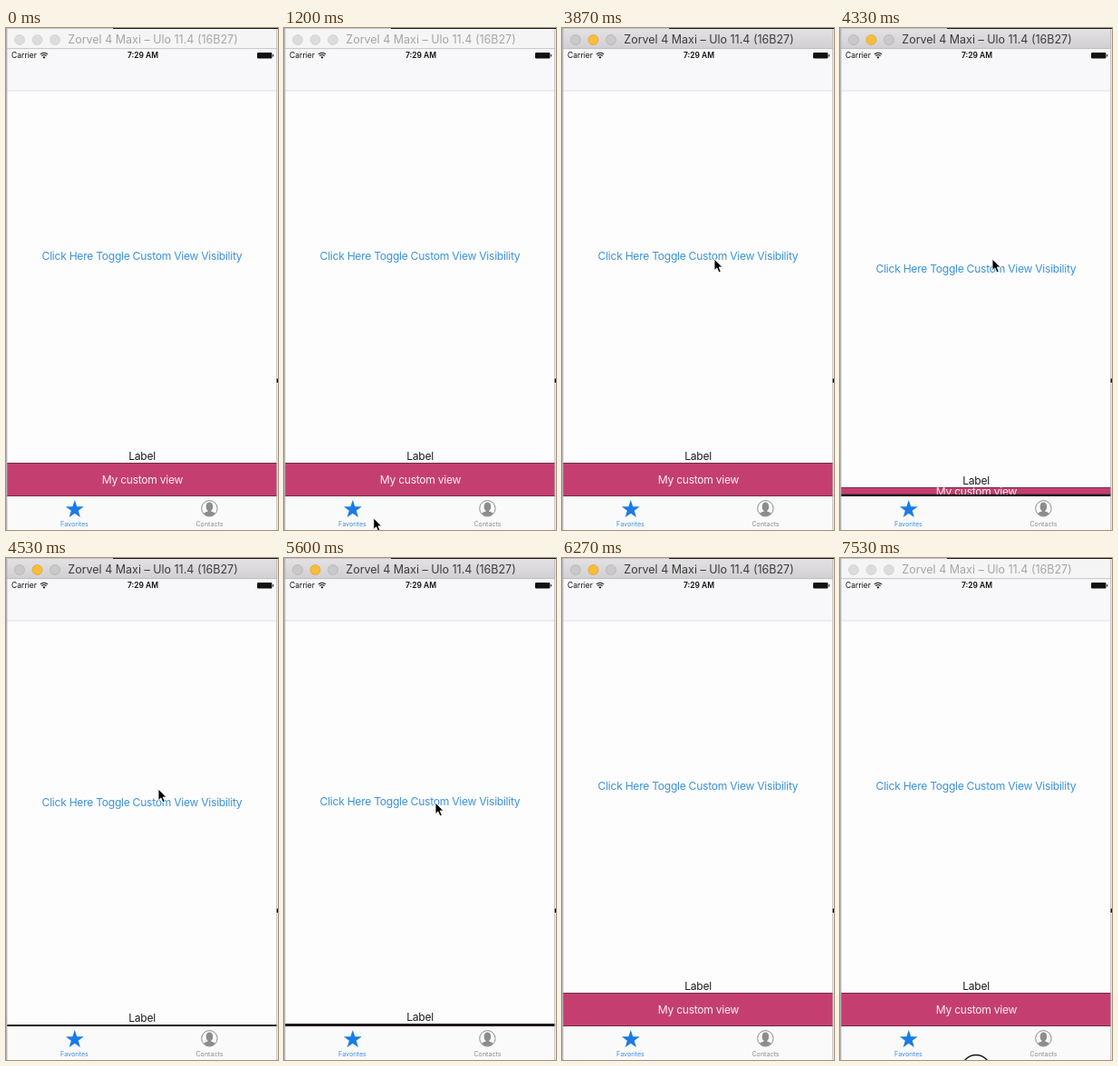
Recreate the animation shown at these times as an HTML page. Size 300 by 552 pixels, loop 7.59 s.

```html
<!DOCTYPE html>
<html lang="en">
<head>
<meta charset="utf-8">
<title>Toggle a bar above the tabs</title>
<style>
  html, body { margin: 0; width: 100%; height: 100%; overflow: hidden; background: #fff; }
  svg { display: block; width: 100vw; height: 100vh; }
  text { font-family: Inter, Roboto, "Liberation Sans", sans-serif; text-anchor: middle; }
  .body { font-size: 12.1px; letter-spacing: -.022em; }
  .status { font-size: 8.5px; }
  .tab { font-size: 7.15px; }
</style>
</head>
<body>
<svg viewBox="0 0 300 552">
  <defs>
    <linearGradient id="chrome" x2="0" y2="1">
      <stop stop-color="#e4e2e4"/><stop offset="1" stop-color="#d1cfd1"/>
    </linearGradient>
    <clipPath id="clip"><rect id="clipBox" width="300"/></clipPath>
  </defs>
  <rect width="300" height="552" fill="#fefdfe"/>

  <!-- moving content -->
  <text id="link" class="body" x="150" y="255.2" fill="#3a92dc">Click Here Toggle Custom View Visibility</text>
  <text id="label" class="body" x="150" y="475.3" fill="#1c1c1c">Label</text>
  <rect id="gap" width="300" fill="#1d181c"/>
  <g clip-path="url(#clip)">
    <rect id="bar" width="300" fill="#c43f70"/>
    <text id="barText" class="body" x="150.5" fill="#fbeef3">My custom view</text>
  </g>

  <!-- navigation and status -->
  <rect y="23" width="300" height="46" fill="#f8f7f9"/>
  <rect y="68.6" width="300" height=".8" fill="#d8d7d9"/>
  <g fill="#111">
    <text class="status" x="20" y="33.4">Carrier</text>
    <text class="status" x="151" y="33.4" font-weight="600">7:29 AM</text>
    <rect x="277" y="26.9" width="16.4" height="6.6" rx="1.2"/>
    <rect x="294.2" y="29" width="1" height="2.6" rx=".5"/>
    <path d="M42 33.8l-1.5-1.9q1.5-1.1 3 0z"/>
  </g>
  <path d="M39.3 30.6q2.7-2.2 5.4 0M37.9 28.9q4.1-3.3 8.2 0" fill="none" stroke="#111" stroke-width="1.1"/>

  <!-- tabs -->
  <rect y="515" width="300" height="37" fill="#fafafa"/>
  <path id="star" fill="#1a7be6"/>
  <text class="tab" x="75.5" y="547.8" fill="#3b8ce4">Favorites</text>
  <g fill="#8c8c8c">
    <circle cx="224.4" cy="528.3" r="8.7" fill="#fafafa" stroke="#8c8c8c" stroke-width="1"/>
    <ellipse cx="224.4" cy="526.4" rx="3.8" ry="5"/>
    <path d="M222.7 529h3.4v2.6q3.6 1 4.6 2.2a8 8 0 0 1-12.6 0q1-1.2 4.6-2.2z"/>
    <text class="tab" x="224.5" y="547.8">Contacts</text>
  </g>

  <!-- window frame -->
  <rect id="titleBar" width="300" height="23"/>
  <rect y="22.3" width="300" height=".8" fill="#b9b9b9"/>
  <g id="lights" stroke-width=".7">
    <circle cx="15" cy="13" r="5.5"/>
    <circle cx="34.5" cy="13" r="5.5"/>
    <circle cx="54" cy="13" r="5.5"/>
  </g>
  <text id="title" x="162" y="17.4" font-size="12.5">Zorvel 4 Maxi – Ulo 11.4 (16B27)</text>
  <rect width="118" height="1" fill="#c4c4c4"/>
  <rect x="118" width="182" height="1" fill="#161616"/>
  <rect width="1.4" height="552" fill="#b2b2b2"/>
  <rect x="298.3" y="1" width=".8" height="551" fill="#b5b5b5"/>
  <rect x="299.1" y="1" width=".9" height="551" fill="#e6e6e6"/>
  <rect x="298.6" y="385.5" width="1.4" height="4.5" fill="#111"/>

  <circle id="ring" cx="150" cy="562.5" fill="#fff" stroke="#111" stroke-width="1.3"/>
  <path id="cursor" d="M0 0V12.6L2.9 9.9 5 14.7 7.3 13.7 5.2 9H9.1Z" fill="#050505" stroke="#fff" stroke-width=".9" stroke-linejoin="round"/>
</svg>
<script>
const LOOP = 7590;
const ACTIVE = [1450, 7100];
const RING = [7400, 7530];
const BAR_TOP = 478, BAR_END = 512, TAB_TOP = 515;

// time, x, y of the pointer tip
const POINTER = [
  [870, 150, 560], [1400, 75, 529], [3220, 75, 529], [3730, 168, 254],
  [4640, 168, 254], [4930, 167, 269], [5930, 167, 269], [6230, 150, 560]
];
// time, top edge of the custom bar
const EDGE = [
  [4000, BAR_TOP], [4480, 513], [4640, 513], [4800, BAR_END], [5640, BAR_END], [6080, BAR_TOP]
];

const $ = id => document.getElementById(id);
const set = (id, attrs) => {
  for (const name in attrs) $(id).setAttribute(name, attrs[name]);
};
const clamp = v => Math.max(0, Math.min(1, v));
const ease = p => p * p * (3 - 2 * p);

function sample(steps, t) {
  if (t <= steps[0][0]) return steps[0].slice(1);
  for (let i = 1; i < steps.length; i++) {
    const a = steps[i - 1], b = steps[i];
    if (t < b[0]) {
      const p = ease((t - a[0]) / (b[0] - a[0]));
      return a.slice(1).map((v, k) => v + (b[k + 1] - v) * p);
    }
  }
  return steps[steps.length - 1].slice(1);
}

function starPath(cx, cy, r) {
  const points = [];
  for (let i = 0; i < 10; i++) {
    const angle = -Math.PI / 2 + i * Math.PI / 5;
    const d = i % 2 ? r * 0.4 : r;
    points.push((cx + d * Math.cos(angle)).toFixed(2) + " " + (cy + d * Math.sin(angle)).toFixed(2));
  }
  return "M" + points.join("L") + "Z";
}

function showWindow(active) {
  set("titleBar", { fill: active ? "url(#chrome)" : "#f5f5f5" });
  set("title", { fill: active ? "#3c3c3c" : "#a6a6a6" });
  [...$("lights").children].forEach((light, i) => {
    const lit = active && i === 1;
    light.setAttribute("fill", lit ? "#f8bd39" : active ? "#c9c9c9" : "#dcdcdc");
    light.setAttribute("stroke", lit ? "#dfa232" : active ? "#b2b2b2" : "#cfcfcf");
  });
}

function showBar(edge) {
  const shift = edge - BAR_TOP;
  const open = clamp((BAR_END - edge) / (BAR_END - BAR_TOP));
  const y = edge + 0.3;
  const height = open * (TAB_TOP - 0.3 - BAR_TOP - 0.3);
  set("link", { transform: `translate(0 ${shift / 2})` });
  set("label", { transform: `translate(0 ${shift})` });
  set("gap", { y: edge, height: TAB_TOP - edge });
  set("bar", { y, height });
  set("clipBox", { y, height });
  set("barText", { y: y + height / 2 + 4.6 });
}

function draw(t) {
  showWindow(t >= ACTIVE[0] && t < ACTIVE[1]);
  showBar(sample(EDGE, t)[0]);
  set("cursor", { transform: `translate(${sample(POINTER, t).join(" ")})` });
  const grow = clamp((t - RING[0]) / (RING[1] - RING[0]));
  set("ring", { r: 8 + 8 * grow, visibility: t < RING[0] ? "hidden" : "visible" });
}

set("star", { d: starPath(75.8, 529.5, 10.4) });
const start = performance.now();
function tick(now) {
  draw(Math.max(0, now - start) % LOOP);
  requestAnimationFrame(tick);
}
draw(0);
requestAnimationFrame(tick);
</script>
</body>
</html>
```
